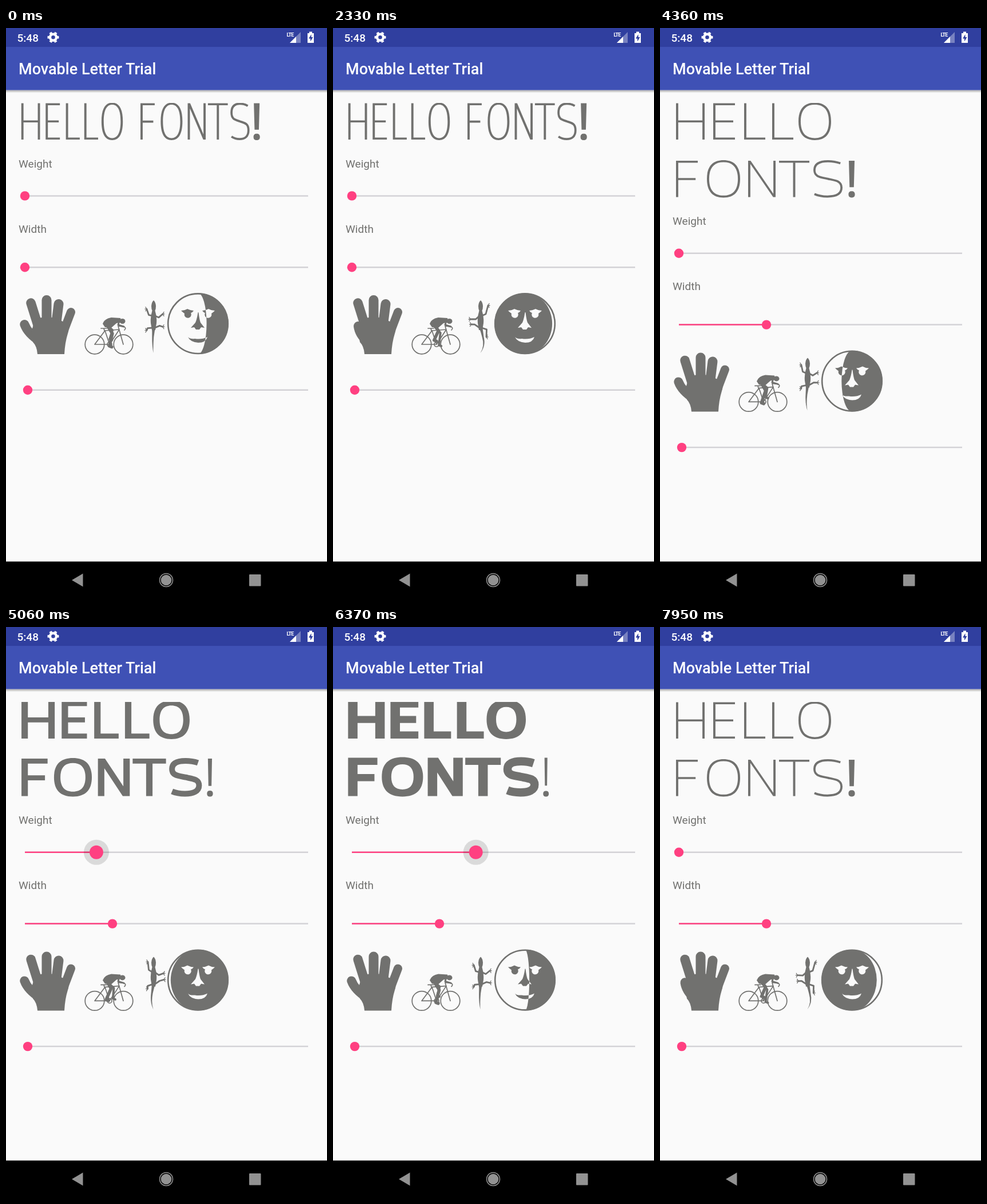
An HTML page for the animation above (8000 ms loop, 561 px wide and 998 px high).

```html
<!DOCTYPE html>
<html lang="en">
<head>
<meta charset="utf-8">
<title>Movable Letter Trial</title>
<style>
  html, body { margin: 0; width: 100%; height: 100%; overflow: hidden; background: #fafafa; }
  svg { display: block; width: 100%; height: 100%; font-family: Roboto, sans-serif; }
  .ink { fill: #71716f; }
  .line { fill: none; stroke: #71716f; stroke-linecap: round; stroke-linejoin: round; }
  #bends { stroke-linecap: butt; }
  .label { font-size: 19px; }
  .track { stroke: #d3d2d6; stroke-width: 2.5; }
  .level { stroke: #ff4081; stroke-width: 2.5; }
  .thumb { fill: #ff4081; }
</style>
</head>
<body>
<svg viewBox="0 0 561 998" preserveAspectRatio="none">
  <defs>
    <linearGradient id="shade" x2="0" y2="1">
      <stop offset="0" stop-opacity=".32"/>
      <stop offset="1" stop-opacity="0"/>
    </linearGradient>
    <clipPath id="headingBox"><rect x="20" y="131" width="530" height="175"/></clipPath>
    <clipPath id="shadowSide"><path id="shadow"/></clipPath>
    <g id="features">
      <path d="M306 494Q312 494 317 491Q323 494 328 494Q326 497 323 498A6 6 0 1 1 312 499Q309 497 306 494Z"/>
      <path d="M365 494Q359 494 354 491Q348 494 343 494Q345 497 348 498A6 6 0 1 0 359 499Q362 497 365 494Z"/>
      <path d="M335.500 497H336.500Q338 510 340 515L347 524L341 523L338 527H332L329 523L323 524L331 515Q334 508 335.500 497Z"/>
      <path d="M318 540Q322 544 330 543Q342 545 352 540Q349 550 336 550Q322 549 318 540Z"/>
    </g>
  </defs>

  <rect width="561" height="998" fill="#fafafa"/>
  <rect y="108.500" width="561" height="5" fill="url(#shade)"/>
  <rect width="561" height="108.500" fill="#3f51b5"/>
  <rect width="561" height="33" fill="#303f9f"/>
  <text x="22" y="81" font-size="27" font-weight="500" fill="#fff">Movable Letter Trial</text>

  <g fill="#fff">
    <text x="19.5" y="23.5" font-size="19" font-weight="500">5:48</text>
    <g fill="none" stroke="#fff">
      <circle cx="82.5" cy="16.3" r="5.500" stroke-width="4.400"/>
      <circle cx="82.5" cy="16.3" r="8.300" stroke-width="3.400" pathLength="12" stroke-dasharray="1" stroke-dashoffset=".5"/>
    </g>
    <text x="490.5" y="15" font-size="9" font-weight="700" letter-spacing="-.9">LTE</text>
    <path d="M515 7V26H496Z" opacity=".35"/>
    <path d="M507 15V26H496Z"/>
    <path d="M527 9H530V6.500H535V9H538V26H527Z"/>
    <path d="M533.500 11L529 18.500H532V23.500L536.500 16H533.500Z" fill="#303f9f"/>
  </g>

  <g clip-path="url(#headingBox)" role="img" aria-label="HELLO FONTS!">
    <path id="letters" class="ink"/>
    <path id="bends" class="line"/>
  </g>

  <g id="content">
    <text class="ink label" x="22" y="244">Weight</text>
    <text class="ink label" x="22" y="358">Width</text>
    <g id="sliders"></g>

    <g class="line">
      <path d="M43.500 480.500L59 530" stroke-width="16.500"/>
      <path d="M71 475.500L71 530M92 482.500L86 530" stroke-width="17"/>
      <path d="M113.500 496.500L100 532" stroke-width="15"/>
      <path id="finger" stroke-width="16"/>
    </g>
    <path class="ink" d="M51 508L63 506H82L92 509L108 518Q111 526 108 534Q103 550 102 570H55Q54 556 47 549L44 532Z"/>

    <g class="line" stroke-width="1.7">
      <circle cx="155" cy="553" r="16.800"/>
      <circle cx="205" cy="553" r="16.800"/>
      <path d="M155 553L173 529L181 553ZM173 529L198 527L181 553M205 553L196 521L206 522Q211 524 207 528M172 529L171 525M166 525H176"/>
      <circle cx="181" cy="553" r="4"/>
      <path id="farLeg" stroke-width="4"/>
      <path id="nearLeg" stroke-width="5.500"/>
      <path d="M198 512L196 519L206 522" stroke-width="3"/>
    </g>
    <path class="ink" d="M169 517Q172 508 184 506L200 507L202 514L193 516L184 524L173 523Z"/>
    <ellipse class="ink" cx="203.500" cy="512.500" rx="5" ry="4.500"/>

    <path class="ink" d="M258 476Q261.500 479 262 486Q262 491 260.500 494Q264 505 263 516L261 528H255L253 516Q252 505 255.500 494Q254 491 254 486Q254.500 479 258 476Z"/>
    <path id="tail" class="ink"/>
    <path id="limbs" class="line" stroke-width="2.800"/>
    <path id="toes" class="line" stroke-width="1.300"/>

    <circle cx="335.500" cy="516.700" r="52.300" fill="#fafafa" stroke="#71716f" stroke-width="2.600"/>
    <use href="#features" class="ink"/>
    <g clip-path="url(#shadowSide)">
      <circle class="ink" cx="335.500" cy="516.700" r="53.500"/>
      <use href="#features" fill="#fafafa"/>
    </g>
  </g>

  <rect y="932.500" width="561" height="66"/>
  <g fill="#929292">
    <path d="M115 965L134.500 953.500V976.500Z"/>
    <circle cx="280" cy="965" r="9.300"/>
    <circle cx="280" cy="965" r="11.500" fill="none" stroke="#929292" stroke-width="1.500"/>
    <rect x="425" y="955" width="20.500" height="20.500" rx="1"/>
  </g>
</svg>
<script>
const LOOP = 8000, TRACK_START = 33, TRACK_END = 528, LINE_STEP = 100.4;
const $ = id => document.getElementById(id);
const setPath = (id, d) => $(id).setAttribute('d', d);
const clamp = x => Math.max(0, Math.min(1, x));
const mix = (a, b, k) => a + (b - a) * k;

// Monotone cubic curve through [time, value] points.
function curve(points) {
  const secant = i => (points[i + 1][1] - points[i][1]) / (points[i + 1][0] - points[i][0]);
  const last = points.length - 1;
  const slope = points.map((_, i) => {
    if (i === 0) return secant(0);
    if (i === last) return secant(last - 1);
    const a = secant(i - 1), b = secant(i);
    return a * b > 0 ? 2 * a * b / (a + b) : 0;
  });
  return t => {
    if (t <= points[0][0]) return points[0][1];
    if (t >= points[last][0]) return points[last][1];
    const i = points.findIndex(p => p[0] > t) - 1;
    const [t0, v0] = points[i], [t1, v1] = points[i + 1];
    const span = t1 - t0, u = (t - t0) / span, w = 1 - u;
    return v0 * (1 + 2 * u) * w * w + slope[i] * span * u * w * w
      + v1 * u * u * (3 - 2 * u) - slope[i + 1] * span * u * u * w;
  };
}

const widthThumb = curve([[2820, 33], [3060, 107], [3560, 186], [3800, 186]]);
const weightThumb = curve([[4580, 33], [4840, 95], [5530, 295], [5930, 385], [6030, 383], [6370, 250], [7080, 33]]);
const moonPhase = curve([[0, 2.41], [1270, 1.37], [2400, 1.15], [3060, 1.42], [4360, 2.61],
  [5200, 2.86], [5530, 2.82], [6370, 2.455], [7590, 1.32], [7950, 1.2], [8000, 1.19]]);
const pressed = (t, from, to) => clamp((t - from) / 320) * clamp((to - t) / 150);
const fraction = x => (x - TRACK_START) / (TRACK_END - TRACK_START);

function slider(start, y) {
  const group = document.createElementNS('http://www.w3.org/2000/svg', 'g');
  group.innerHTML = `<path class="track" d="M${start} ${y}H${TRACK_END}"/><path class="level"/>
    <circle class="ripple" cy="${y}" r="22"/><circle class="thumb" cy="${y}"/>`;
  $('sliders').append(group);
  const [, level, ripple, thumb] = group.children;
  return (x, press) => {
    level.setAttribute('d', `M${start} ${y}H${x}`);
    ripple.setAttribute('cx', x);
    ripple.setAttribute('opacity', .13 * clamp(press * 2));
    thumb.setAttribute('cx', x);
    thumb.setAttribute('r', mix(8.2, 12, press));
  };
}
const setWeight = slider(33, 293.4);
const setWidth = slider(33, 418.2);
slider(38, 632.7)(38, 0);

// Each entry: letter, light width, heavy width, light gap after, heavy gap after.
const HELLO = [['H', 50, 67, 15, 9], ['E', 38, 51, 16, 9], ['L', 37, 49, 12, 10], ['L', 37, 49, 9, 4], ['O', 57, 71, 0, 0]];
const FONTS = [['F', 38, 54, 16, 6], ['O', 58, 75, 14, 7], ['N', 48, 64, 6, 4], ['T', 53, 64, 7, 4], ['S', 51, 64, 10, 6], ['!', 12, 12, 0, 0]];

const box = (x, y, w, h) => `M${x} ${y}h${w}v${h}h${-w}Z`;
function oval(x, y, w, h) {
  const a = w / 2, b = h / 2, k = .66, cx = x + a, cy = y + b;
  return `M${cx} ${y}C${cx + a * k} ${y} ${x + w} ${cy - b * k} ${x + w} ${cy}`
    + `S${cx + a * k} ${y + h} ${cx} ${y + h}S${x} ${cy + b * k} ${x} ${cy}S${cx - a * k} ${y} ${cx} ${y}Z`;
}

const glyphs = {
  H: (x, y, w, h, v, s) => box(x, y, v, h) + box(x + w - v, y, v, h) + box(x, y + (h - s) / 2, w, s),
  L: (x, y, w, h, v, s) => box(x, y, v, h) + box(x, y + h - s, w, s),
  F: (x, y, w, h, v, s) => box(x, y, v, h) + box(x, y, w, s) + box(x, y + h * .5 - s * .4, w * .9, s),
  E: (x, y, w, h, v, s) => glyphs.L(x, y, w, h, v, s) + box(x, y, w, s) + box(x, y + (h - s) / 2, w * .92, s),
  T: (x, y, w, h, v, s) => box(x, y, w, s) + box(x + (w - v) / 2, y, v, h),
  N: (x, y, w, h, v) => box(x, y, v, h) + box(x + w - v, y, v, h)
    + `M${x} ${y}h${v * 1.1}L${x + w} ${y + h}h${-v * 1.1}Z`,
  O: (x, y, w, h, v, s) => oval(x, y - 1, w, h + 2) + oval(x + w - v, y - 1 + s, 2 * v - w, h + 2 - 2 * s),
  '!': (x, y, w, h, v, s, q) => {
    const a = Math.max(1.6, 5 - 3 * q), b = a * .75, c = x + w / 2, r = 5.6 - .8 * q;
    return `M${c - a} ${y}h${2 * a}L${c + b} ${y + h * .73}h${-2 * b}Z` + oval(c - r, y + h - 2 * r + 1, 2 * r, 2 * r);
  }
};

function bend(x, y, w, h, thick) {
  const px = u => x + thick / 2 + u * (w - thick), py = u => y - 1 + thick / 2 + u * (h + 2 - thick);
  const p = (a, b) => `${px(a)} ${py(b)} `;
  return `M${p(.96, .06)}Q${p(.75, 0)}${p(.5, 0)}C${p(.18, 0)}${p(0, .08)}${p(0, .25)}`
    + `C${p(0, .44)}${p(.2, .45)}${p(.5, .5)}C${p(.8, .55)}${p(1, .56)}${p(1, .75)}`
    + `C${p(1, .93)}${p(.78, 1)}${p(.48, 1)}Q${p(.2, 1)}${p(0, .93)}`;
}

function drawHeading(width, weight, wrapped) {
  const q = weight / .53, stretch = mix(.655, 1, width / .309);
  const v = 3.9 + 15.3 * q, s = 3.6 + 10.7 * q, h = 63.5 + 4 * q;
  const thick = (v + s) / 2, left = 24.3 + 3.7 * stretch - 2 * q;
  let solid = '', bent = '';
  const size = (light, heavy) => light * stretch + (heavy - light) * q;
  const word = (letters, x, baseline) => {
    for (const [name, light, heavy, gap, heavyGap] of letters) {
      const w = name === '!' ? 12 : size(light, heavy), y = baseline - h;
      if (name === 'S') bent += bend(x, y, w, h, thick);
      else solid += glyphs[name](x, y, w, h, v, s, q);
      x += w + size(gap, heavyGap);
    }
    return x;
  };
  const end = word(HELLO, left, 195);
  if (wrapped) word(FONTS, left, 195 + LINE_STEP);
  else word(FONTS, end + 47 * stretch, 195);
  setPath('letters', solid);
  setPath('bends', bent);
  $('bends').setAttribute('stroke-width', thick);
}

function drawMoon(phase) {
  const cx = 335.5, top = 463.2, bottom = 570.2, r = 53.5;
  const c = Math.cos(Math.PI * (phase % 1));
  setPath('shadow', `M${cx} ${top}A${r} ${r} 0 0 ${phase > 2 ? 1 : 0} ${cx} ${bottom}`
    + `A${Math.abs(c) * r} ${r} 0 0 ${c > 0 ? 0 : 1} ${cx} ${top}Z`);
}

function drawHand(phase) {
  const k = clamp((phase - 1.15) / 1.15);
  setPath('finger', `M${mix(44, 32.3, k)} ${mix(521, 518, k)}Q${mix(46, 38, k)} ${mix(536, 534, k)} 60 548`);
}

function drawLizard(phase) {
  const u = (phase - 2) / .85;
  const limbs = [
    [256, 503, 249.5, 504 - 5 * u, 244 + 4 * u, 497 - 12 * u, -1],
    [260, 503, 267, 504 + 4 * u, 273 + 2 * u, 495 + 10 * u, 1],
    [256, 524, 247.5, 522.5 + 4.4 * u, 244.5 + 3 * u, 525 + 7 * u, -1],
    [260, 524, 268.5, 522.5 - 4.4 * u, 272 + 4 * u, 528 - 12 * u, 1]
  ];
  setPath('limbs', limbs.map(([x, y, kx, ky, fx, fy]) => `M${x} ${y}L${kx} ${ky}L${fx} ${fy}`).join(''));
  setPath('toes', limbs.map(([, , , , x, y, side]) =>
    [-1, 0, 1].map(n => `M${x} ${y}l${side * (3 - Math.abs(n))} ${n * 3.5}`).join('')).join(''));
  const bulge = -7 * u;
  setPath('tail', `M255 522Q${256.5 + bulge * .3} 532 ${257 + bulge * .5} 540Q${258.5 + bulge} 556 257.500 568`
    + `Q${260.5 + bulge} 556 ${260 + bulge * .5} 540Q${260.5 + bulge * .3} 532 261 522Z`);
}

function drawLegs(phase) {
  const leg = angle => {
    const x = 181 + 6 * Math.cos(angle), y = 550 + 6 * Math.sin(angle);
    return `M177 520L${186 + (x - 181) * .4} ${531 + (y - 550) * .5}L${x} ${y}l4 1.500`;
  };
  const angle = Math.PI * (phase - 1.9);
  setPath('nearLeg', leg(angle));
  setPath('farLeg', leg(angle + Math.PI));
}

function render(t) {
  const wide = widthThumb(t), heavy = weightThumb(t), phase = moonPhase(t);
  const wrapped = fraction(wide) > .13;
  setWidth(wide, pressed(t, 2850, 3920));
  setWeight(heavy, pressed(t, 4560, 7240));
  drawHeading(fraction(wide), fraction(heavy), wrapped);
  $('content').setAttribute('transform', `translate(0 ${wrapped ? LINE_STEP : 0})`);
  drawMoon(phase);
  drawHand(phase);
  drawLizard(phase);
  drawLegs(phase);
}

const began = performance.now();
function tick() {
  render((performance.now() - began) % LOOP);
  requestAnimationFrame(tick);
}
tick();
</script>
</body>
</html>
```
